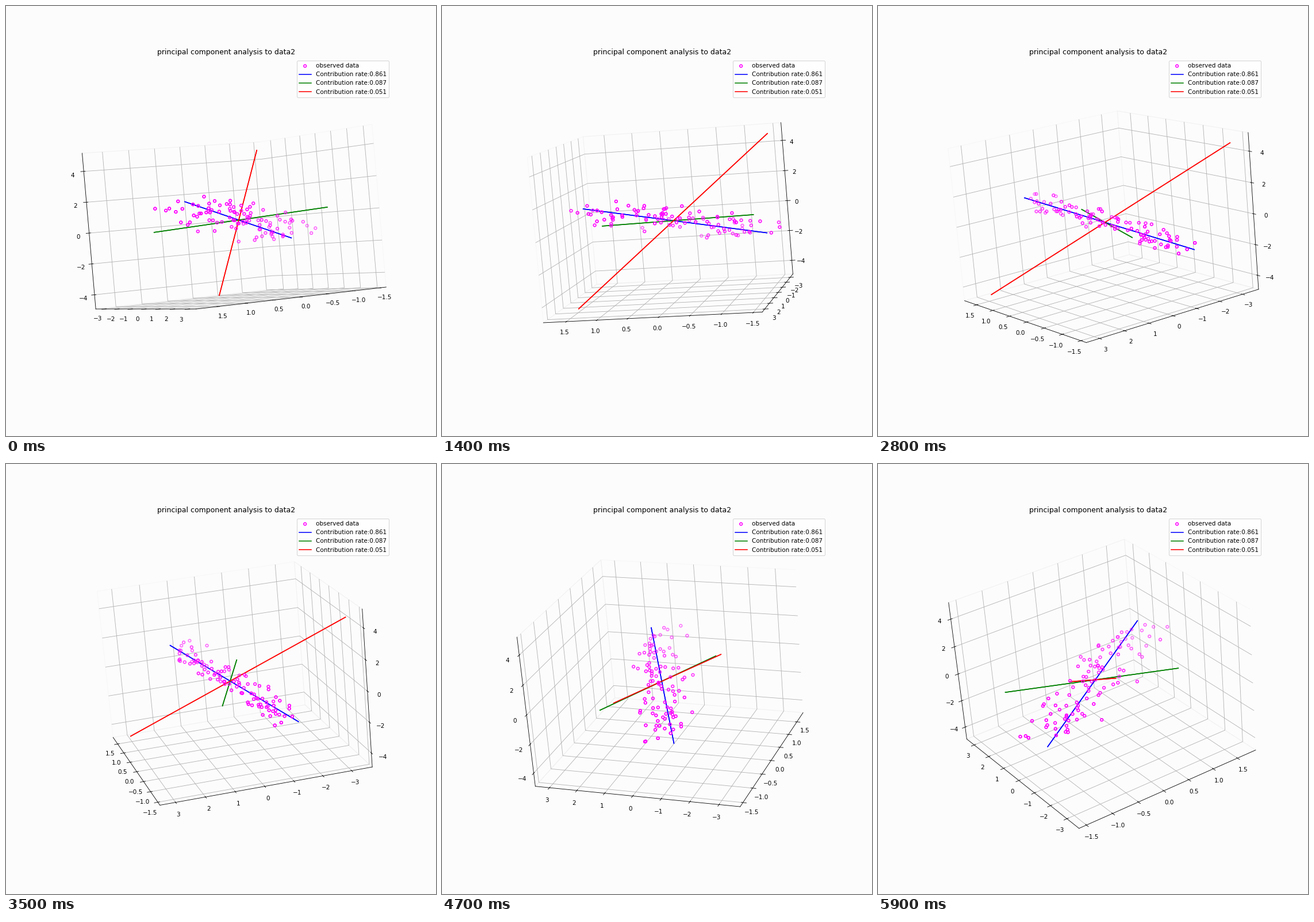
Recreate the animation shown at these times as a matplotlib script. Size 748 px wide and 748 px high, loop 6000 ms.

```python
import numpy as np
import matplotlib.pyplot as plt
from matplotlib.animation import FuncAnimation

SIZE, INCHES = 748, 10
FRAMES, INTERVAL = 60, 100
BG = "#fcfcfc"

plt.rcParams["font.family"] = "DejaVu Sans"

# Direction of each principal component, per unit of x
AXES = np.array([[1, 1.01, 1.044], [1, -0.744, -0.229], [1, 2.307, -3.225]])
COLORS = ("blue", "green", "red")
RATES = (0.861, 0.087, 0.051)


def make_cloud(total=100):
    """Even spread along the first component, noise along the others."""
    rng = np.random.default_rng(7)
    outliers = np.array([[1.66, 0.49, 1.14], [1.35, 0.03, 0.98],
                         [1.26, 0.66, 0.17], [0.61, -0.66, -0.49],
                         [-1.4, -0.49, -0.48], [-1.02, -1.41, -0.91]])
    n = total - len(outliers)
    scores = np.column_stack([
        np.linspace(-2.1, 2.05, n) + rng.normal(0, 0.06, n),
        np.clip(rng.normal(0, 0.4, n), -0.75, 0.75),
        np.clip(rng.normal(0, 0.31, n), -0.6, 0.6),
    ])
    unit = AXES / np.linalg.norm(AXES, axis=1, keepdims=True)
    return np.vstack([outliers, scores @ unit])


def draw_data(cloud, span):
    ax.scatter(*cloud.T, s=20, facecolors="none", edgecolors="magenta",
               linewidths=1.5, label="observed data")
    for direction, color, rate in zip(AXES, COLORS, RATES):
        ax.plot(*np.outer(direction, span), color=color, lw=1.5,
                label=f"Contribution rate:{rate:.3f}")


fig = plt.figure(figsize=(INCHES, INCHES), dpi=SIZE / INCHES, facecolor=BG)
ax = fig.add_subplot(projection="3d", facecolor=BG)
ax.set_title("principal component analysis to data2")

cloud = make_cloud()
span = np.linspace(-1.423, 1.338, 30)
draw_data(cloud, span)
ax.legend(loc="upper right")
# A second pass strengthens line edges and the paler far markers
draw_data(cloud, span)

ax.set(xlim=(-1.64, 1.88), ylim=(-3.72, 3.52), zlim=(-4.92, 5.18),
       xticks=np.arange(-1.5, 1.6, 0.5), yticks=np.arange(-3, 4),
       zticks=np.arange(-4, 5, 2))
for axis in (ax.xaxis, ax.yaxis, ax.zaxis):
    axis.pane.set_fill(False)


def update(i):
    # A hair above the horizon keeps the floor pane at the bottom
    ax.view_init(elev=max(0.5 * i, 0.01), azim=60 + 360 / 119 * i, roll=5)
    return []


anim = FuncAnimation(fig, update, frames=FRAMES, interval=INTERVAL,
                     init_func=lambda: update(0), repeat=True, repeat_delay=0)
plt.show()
```
